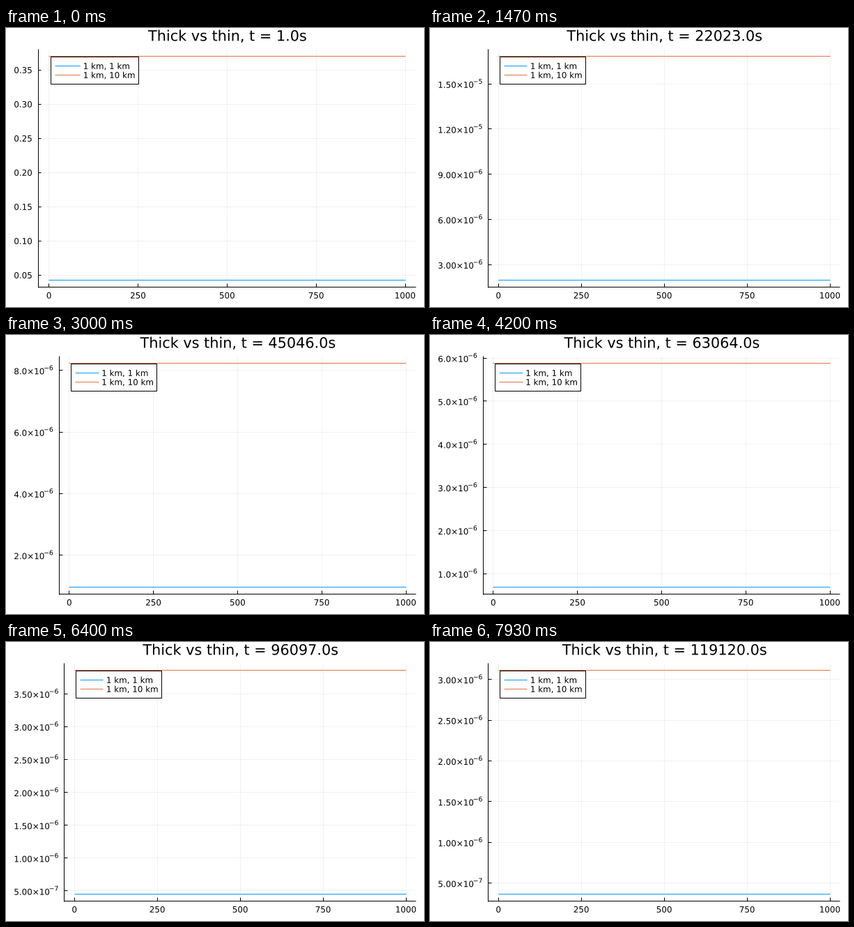
A matplotlib script that plays this animation: 600 by 400 pixels, repeating every 8000 ms.

```python
import math

import matplotlib.pyplot as plt
from matplotlib.animation import FuncAnimation
from matplotlib.patches import PathPatch, Rectangle
from matplotlib.textpath import TextPath
from matplotlib.transforms import Affine2D

plt.rcParams["font.family"] = "DejaVu Sans"

WIDTH, HEIGHT, DPI = 600, 400, 100
TICK_MS, LOOP_MS = 20, 8000
RIGHT, TOP, BOTTOM = 588.5, 30.6, 371.6
THIN, THICK = 0.0429, 0.371          # both decay as 1 / t
BLUE, ORANGE = "#009AFA", "#E36F47"
EM, TITLE_EM, EXP_EM = 11.9, 20.8, 9.3
CAP = 0.729 * EM
EXP_KERN = 1.2
GRID_ALPHA = 0.05
PX = 72 / DPI
HALF = 0.5                           # puts a snapped stroke on the pixel it falls in
PAD = 0.03
STEPS = ((1, 1.0), (5, 0.9), (2, 0.7), (2.5, 0.5), (3, 0.2))

fig = plt.figure(figsize=(WIDTH / DPI, HEIGHT / DPI), dpi=DPI, facecolor="white")
ax = fig.add_axes([0, 0, 1, 1])


def line(x0, y0, x1, y1, color="black", alpha=1.0, z=2):
    ax.plot([x0 - HALF, x1 - HALF], [y0 - HALF, y1 - HALF], color=color,
            alpha=alpha, lw=PX, zorder=z, solid_capstyle="butt")


def text(x, baseline, s, em=EM, center=False):
    path = TextPath((0, 0), s, size=em)
    if center:
        box = path.get_extents()
        x -= (box.x0 + box.x1) / 2
    place = Affine2D().scale(1, -1).translate(x, baseline)
    ax.add_patch(PathPatch(place.transform_path(path), fc="black", lw=0,
                           zorder=6, snap=False))


def advance(s, em):
    return em * sum({".": 0.318, "×": 0.838, "−": 0.838}.get(c, 0.636) for c in s)


def nice_ticks(lo, hi):
    """Pick the step with the best mix of count, coverage and roundness."""
    span = hi - lo
    power = math.floor(math.log10(span))
    best, best_key = [], (-1, 0)
    for z in (power, power - 1):
        for q, nice in STEPS:
            step = q * 10.0 ** z
            first, last = math.ceil(lo / step), math.floor(hi / step)
            n = last - first + 1
            if not 4 <= n <= 8:
                continue
            score = (1 - abs(n - 5) / 5) / 4 + 0.5 * span / ((n - 1) * step) + nice / 4
            key = (round(score, 9), step)
            if key > best_key:
                best_key = key
                best = [i * step for i in range(first, last + 1)]
    return best


def decimals(values):
    return max(next(d for d in range(12) if abs(round(v, d) - v) < 1e-9)
               for v in values)


def tick_labels(ticks):
    """Return (main, exponent) pairs; the exponent is empty in plain style."""
    if abs(math.log10(ticks[-1] - ticks[0])) <= 4 + 1e-9:
        d = decimals(ticks)
        return [(f"{v:.{d}f}", "") for v in ticks]
    d = decimals([float(f"{v:.9e}".split("e")[0]) for v in ticks]) + 1
    labels = []
    for v in ticks:
        mantissa, power = f"{v:.{d}e}".split("e")
        labels.append((f"{mantissa}×10", f"−{abs(int(power))}"))
    return labels


def label_width(label):
    main, power = label
    return advance(main, EM) + (advance(power, EXP_EM) - EXP_KERN if power else 0)


def draw_y_label(right, y, label):
    main, power = label
    x = right - label_width(label)
    if not power:
        text(x, y + CAP / 2 - HALF, main)
        return
    text(x, y + 5.6, main)
    text(x + advance(main, EM) - EXP_KERN, y - 0.3, power, EXP_EM)


def draw_legend(left, width):
    x, y = left + width / 30, TOP + (BOTTOM - TOP) / 30
    names = (("1 km, 1 km", BLUE), ("1 km, 10 km", ORANGE))
    start = x + width / 90
    end = start + width / 15
    box_w = width / 90 + width / 15 + width / 60 + 6.286 * EM
    ax.add_patch(Rectangle((x - HALF, y - HALF), box_w, 39, fc="white", ec="black",
                           lw=PX, zorder=4))
    for row, (name, color) in enumerate(names, 1):
        mid = y + 13 * row
        line(start, mid, end, mid, color, z=5)
        text(end + width / 130, mid + CAP / 2 - HALF, name)


def draw_plot(t):
    ax.clear()
    ax.set_xlim(0, WIDTH)
    ax.set_ylim(HEIGHT, 0)
    ax.axis("off")

    thin, thick = THIN / t, THICK / t
    margin = PAD * (thick - thin)
    lo, hi = thin - margin, thick + margin
    ticks = nice_ticks(lo, hi)
    labels = tick_labels(ticks)
    left = 19.8 + max(label_width(s) for s in labels)
    width = RIGHT - left

    def px(v):
        return left + width * (v / 1000 + PAD) / (1 + 2 * PAD)

    def py(v):
        return BOTTOM - (BOTTOM - TOP) * (v - lo) / (hi - lo)

    for v in range(0, 1001, 250):
        x = px(v)
        line(x, TOP, x, BOTTOM, alpha=GRID_ALPHA, z=1)
        line(x, BOTTOM, x, BOTTOM - 4.7)
        text(x, 387.7, str(v), center=True)
    for v, label in zip(ticks, labels):
        y = py(v)
        line(left, y, RIGHT, y, alpha=GRID_ALPHA, z=1)
        line(left, y, left + 4.7, y)
        draw_y_label(left - 8.5, y, label)

    line(left, TOP, left, BOTTOM + HALF)
    line(left, BOTTOM, RIGHT, BOTTOM)
    for v, color in ((thin, BLUE), (thick, ORANGE)):
        line(px(0), py(v), px(1000), py(v), color, z=3)

    draw_legend(left, width)
    text((left + RIGHT) / 2, 18.4, f"Thick vs thin, t = {t:.1f}s", TITLE_EM, center=True)


shown = None


def reset():
    global shown
    shown = None
    return []


def draw(tick):
    """Show 15 plots a second; redraw only when the plot changes."""
    global shown
    step = (3 * tick + 2) // 10
    if step != shown:
        draw_plot(1.0 + 1001 * step)
        shown = step
    return []


anim = FuncAnimation(fig, draw, frames=LOOP_MS // TICK_MS, interval=TICK_MS,
                     init_func=reset, repeat=True, repeat_delay=0)
plt.show()
```
